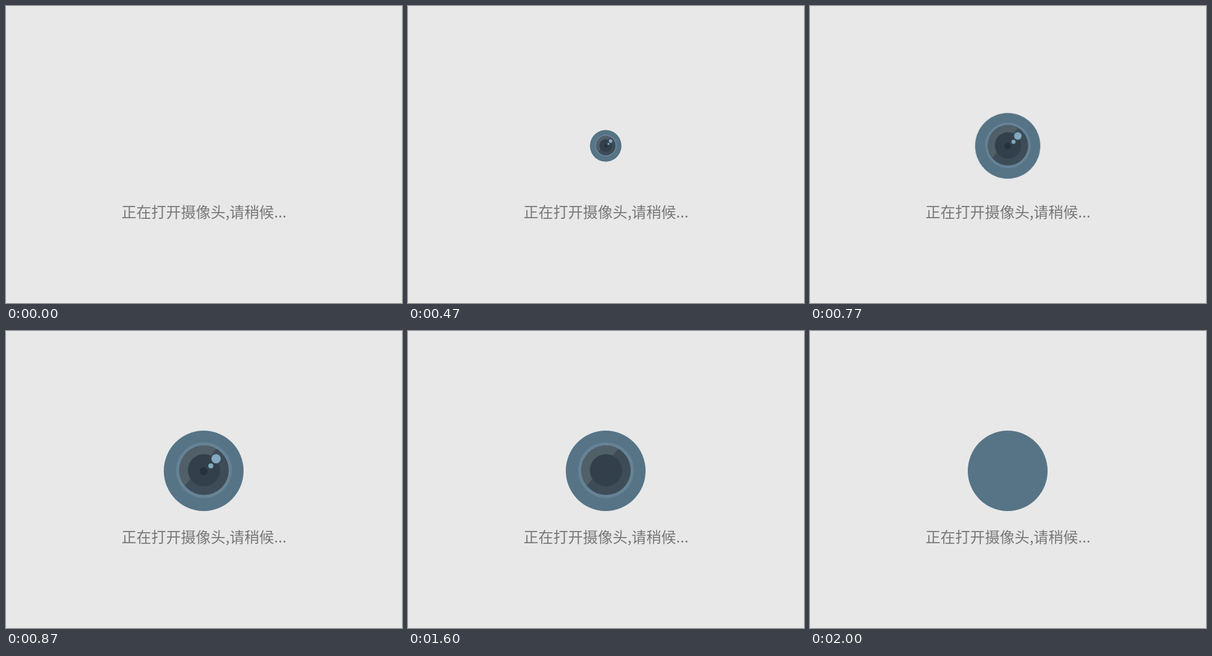
These frames come from a looping animation (640x480 px, 2.1 s). An HTML page:

```html
<!DOCTYPE html>
<html lang="zh-CN">
<head>
<meta charset="utf-8">
<title>正在打开摄像头</title>
<style>
  html, body { margin: 0; width: 100%; height: 100%; overflow: hidden; background: #e8e8e8; }
  svg { display: block; width: 640px; height: 480px; }
  text { font: 24px "Noto Sans CJK SC", "Noto Sans CJK", sans-serif; fill: #777; text-anchor: middle; }

  /* Every part changes in hard steps on one shared 2.1 s clock. */
  .camera, .camera * { animation: 2.1s step-end infinite; }
  .camera { transform-origin: 319.5px 226px; animation-name: grow; }
  .glint { animation-name: glint; }
  .spark { animation-name: hide-spark; }
  .pupil { animation-name: hide-pupil; }
  .iris  { animation-name: hide-iris; }
  .sheen { animation-name: hide-sheen; }
  .lens  { animation-name: hide-lens; }
  .ring  { animation-name: hide-ring; }

  @keyframes grow {
    0%      { transform: scale(0); }
    14.285% { transform: scale(.112); }
    17.619% { transform: scale(.253); }
    22.38%  { transform: scale(.394); }
    27.142% { transform: scale(.535); }
    31.904% { transform: scale(.676); }
    36.666% { transform: scale(.817); }
    41.428%, 100% { transform: scale(1); }
  }
  @keyframes glint {
    0%      { transform: none; opacity: 1; }
    60.476% { transform: translateX(-2px); opacity: 1; }
    65.238%, 100% { transform: translateX(-2px); opacity: 0; }
  }
  @keyframes hide-spark { 0% { opacity: 1; } 70%, 100%     { opacity: 0; } }
  @keyframes hide-pupil { 0% { opacity: 1; } 76.19%, 100%  { opacity: 0; } }
  @keyframes hide-iris  { 0% { opacity: 1; } 80.952%, 100% { opacity: 0; } }
  @keyframes hide-sheen { 0% { opacity: 1; } 85.714%, 100% { opacity: 0; } }
  @keyframes hide-lens  { 0% { opacity: 1; } 90.476%, 100% { opacity: 0; } }
  @keyframes hide-ring  { 0% { opacity: 1; } 95.238%, 100% { opacity: 0; } }
</style>
</head>
<body>
<svg viewBox="0 0 640 480">
  <g class="camera">
    <ellipse cx="319.5" cy="226" rx="64.5" ry="65" fill="#567486"/>
    <circle class="ring" cx="320" cy="225" r="45" fill="#668396"/>
    <circle class="lens" cx="320" cy="225" r="40" fill="#3e4c58"/>
    <path class="sheen" d="M288.8 250A40 40 0 0 1 340 190.4Z" fill="#515f69"/>
    <circle class="iris" cx="320" cy="225" r="26" fill="#33404b"/>
    <circle class="pupil" cx="319.5" cy="226.5" r="6.5" fill="#26313b"/>
    <circle class="spark" cx="331" cy="218" r="4" fill="#83a9c0"/>
    <circle class="glint" cx="339.5" cy="206.5" r="7.5" fill="#83a9c0"/>
  </g>
  <text x="320" y="342">正在打开摄像头,请稍候...</text>
</svg>
</body>
</html>
```
